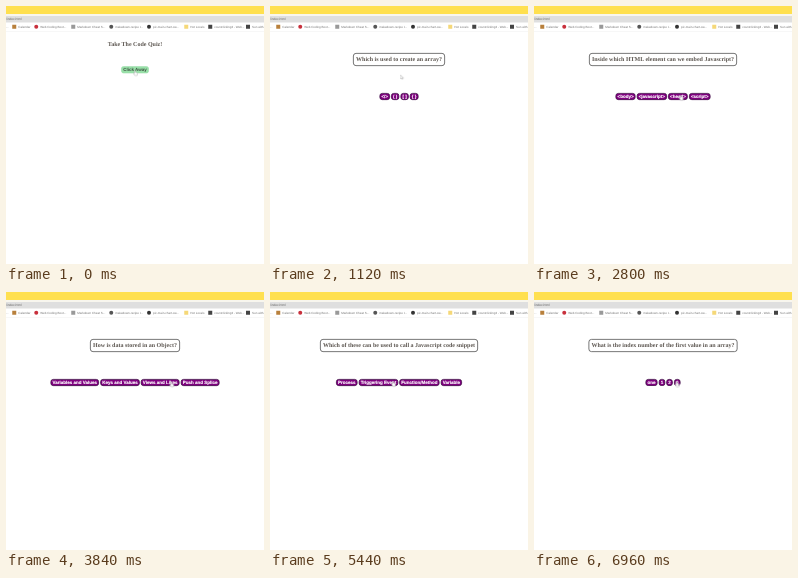
These frames come from a looping animation (258x258 px, 7.12 s). An HTML page:

```html
<!DOCTYPE html>
<html lang="en">
<head>
<meta charset="utf-8">
<title>Code Quiz</title>
<style>
  html, body { margin: 0; width: 100%; height: 100%; overflow: hidden; background: #fff; }

  /* Laid out as a 1032px page, shown at a quarter of its size. */
  .page {
    position: absolute; top: 0; left: 0; width: 1032px; height: 1032px; overflow: hidden;
    transform: scale(.25); transform-origin: 0 0;
    font-family: "Liberation Sans", Arial, sans-serif;
    text-rendering: geometricPrecision;
  }
  .page * { box-sizing: border-box; }

  .tabs { position: absolute; inset: 0 0 auto; height: 32px; background: #ffe04f; }
  .address {
    position: absolute; top: 32px; left: 0; right: 0; height: 34px;
    background: #dfdfdf; border-top: 8px solid #f8f6ee;
    color: #666; font-size: 13px; line-height: 26px;
  }
  .bookmarks {
    position: absolute; top: 66px; left: 0; right: 0; height: 38px;
    border-bottom: 2px solid #eee;
    color: #707070; font-size: 12px; line-height: 34px; white-space: nowrap;
  }
  .bookmarks span { position: absolute; left: var(--x); }
  .bookmarks span::before {
    content: ""; position: absolute; left: -24px; top: 9px; width: 16px; height: 16px;
    border-radius: var(--r, 50%); background: var(--c);
  }
  .bookmarks .square { --r: 0; }

  .view { position: absolute; top: 110px; left: 0; right: 0; bottom: 0; overflow: hidden; }
  .reel { animation: scenes 7120ms step-end infinite; }
  .scene { position: relative; height: 922px; }
  .scene > * { position: absolute; left: 0; right: 0; display: flex; justify-content: center; }
  h2 {
    top: 78px; margin: 0; height: 52px;
    font: bold 24px/46px "Liberation Serif", "Times New Roman", serif;
    color: #5c5650; white-space: nowrap;
  }
  h2 span { padding: 0 9px; border: 3px solid #4a4a4a; border-radius: 12px; }
  .intro h2 { top: 18px; }
  .intro h2 span { border-color: transparent; }
  .answers { top: 238px; gap: 4.5px; }
  .answers b {
    height: 28px; padding: 0 5px; border: 3px solid #3a0a40; border-radius: 11px;
    background: #800080; color: #fff; font-size: 18px; line-height: 22px; white-space: pre;
    -webkit-text-stroke: .6px #fff;
  }
  .intro .answers { top: 131px; }
  .intro b {
    background: #98e0a8; border-color: #98dca8; border-radius: 8px;
    color: #3c5040; -webkit-text-stroke: 0;
  }

  .cursor { position: absolute; top: 0; left: 0; animation: move 7120ms infinite; }
  .cursor svg { position: absolute; overflow: visible; width: 1px; height: 1px; }
  .cursor path { fill: #fff; stroke: #999; stroke-width: 2; stroke-linejoin: round; transform: translateY(4px) scale(.8); }
  .hand { animation: hand 7120ms step-end infinite; }
  .arrow { animation: arrow 7120ms step-end infinite; }

  @keyframes scenes {
    0% { transform: translateY(0); }
    10.1% { transform: translateY(-922px); }
    34.82% { transform: translateY(-1844px); }
    53.92% { transform: translateY(-2766px); }
    75.27% { transform: translateY(-3688px); }
    97.74%, 100% { transform: translateY(-4610px); }
  }
  @keyframes move {
    0% { transform: translate(516px, 254px); }
    10.1% { transform: translate(516px, 254px); animation-timing-function: steps(6, start); }
    16.83% { transform: translate(522px, 272px); animation-timing-function: steps(2, start); }
    19.1% { transform: translate(534px, 288px); }
    22.46% { transform: translate(534px, 288px); animation-timing-function: steps(4, start); }
    26.95% { transform: translate(568px, 352px); }
    39.31% { transform: translate(568px, 352px); animation-timing-function: steps(5, start); }
    44.93% { transform: translate(661px, 355px); }
    56.17% { transform: translate(661px, 355px); animation-timing-function: steps(8, start); }
    65.14% { transform: translate(504px, 343px); }
    68.53% { transform: translate(504px, 343px); animation-timing-function: steps(2, start); }
    70.77% { transform: translate(492px, 353px); }
    86.5% { transform: translate(492px, 353px); animation-timing-function: steps(5, start); }
    92.12%, 100% { transform: translate(570px, 354px); }
  }
  @keyframes hand {
    0%, 25.81%, 68.53%, 100% { visibility: visible; }
    10.1%, 56.17% { visibility: hidden; }
  }
  @keyframes arrow {
    0%, 25.81%, 68.53%, 100% { visibility: hidden; }
    10.1%, 56.17% { visibility: visible; }
  }
</style>
</head>
<body>
<div class="page">
  <div class="tabs"></div>
  <div class="address">/index.html</div>
  <div class="bookmarks">
    <i>...</i>
    <span class="square" style="--x:49px;--c:#b8803c">Calendar</span>
    <span style="--x:137px;--c:#c8303c">Web Coding Boot...</span>
    <span class="square" style="--x:285px;--c:#999">Markdown Cheat S...</span>
    <span style="--x:437px;--c:#555">makedown-recipe I...</span>
    <span style="--x:588px;--c:#333">pic-main-chart-sw...</span>
    <span class="square" style="--x:737px;--c:#f5d878">Hot Locals</span>
    <span class="square" style="--x:833px;--c:#444">countclicking3 - Web...</span>
    <span class="square" style="--x:984px;--c:#444">Sun with...</span>
  </div>

  <div class="view"><div class="reel" id="reel"></div></div>

  <div class="cursor">
    <svg class="hand"><path d="M-3 1q3-3 5 0v8l9 3q3 1 2 5l-2 8h-12l-7-9q0-4 5-1z"/></svg>
    <svg class="arrow"><path d="M0 0v19l5-4 3 7 4-2-3-6h6z"/></svg>
  </div>
</div>

<script>
  const scenes = [
    ["Take The Code Quiz!", "Click Away"],
    ["Which is used to create an array?", "</>", "( )", "[ ]", "{ }"],
    ["Inside which HTML element can we embed Javascript?", "<body>", "<javascript>", "<head>", "<script>"],
    ["How is data stored in an Object?", "Variables and Values", "Keys and Values", "Views and Likes", "Push and Splice"],
    ["Which of these can be used to call a Javascript code snippet", "Process", "Triggering Event", "Function/Method", "Variable"],
    ["What is the index number of the first value in an array?", "one", "1", "2", "0"]
  ];

  function add(parent, tag, className = "", text = "") {
    const node = document.createElement(tag);
    node.className = className;
    node.textContent = text;
    return parent.appendChild(node);
  }

  scenes.forEach(([question, ...answers], i) => {
    const scene = add(document.getElementById("reel"), "div", i ? "scene" : "scene intro");
    add(add(scene, "h2"), "span", "", question);
    const row = add(scene, "div", "answers");
    answers.forEach(answer => add(row, "b", "", answer));
  });
</script>
</body>
</html>
```
